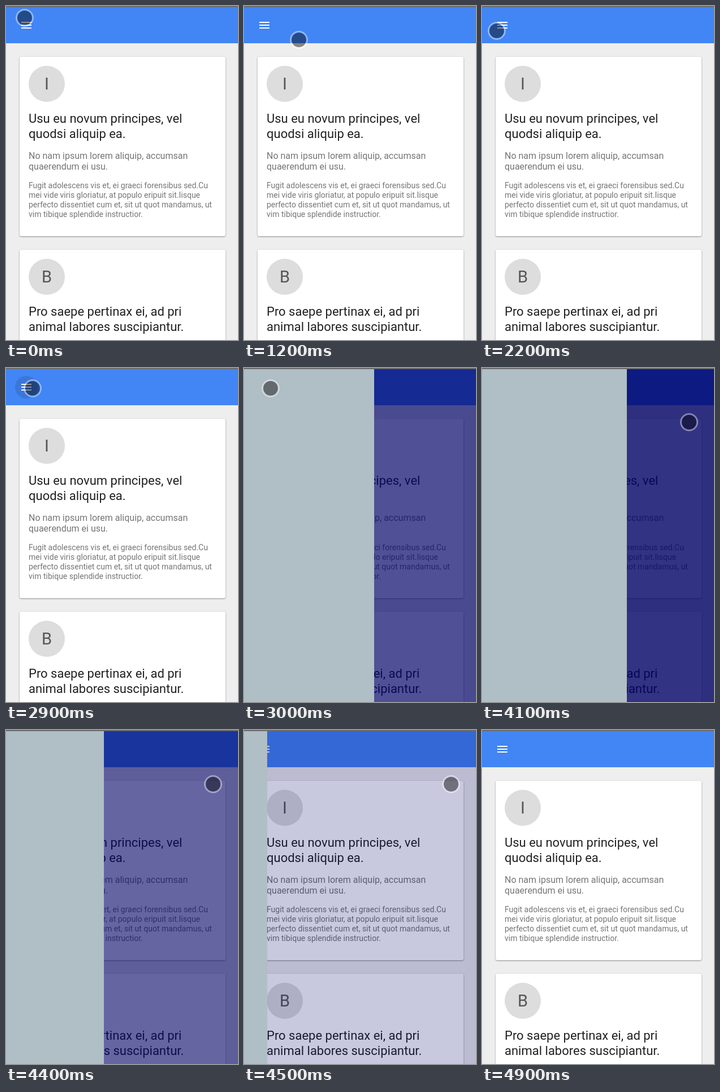
These frames come from a looping animation (410 px wide and 592 px high, 7000 ms). An HTML page:

```html
<!DOCTYPE html>
<html lang="la">
<head>
<meta charset="utf-8">
<title>Side drawer</title>
<style>
  html, body { margin: 0; width: 100%; height: 100%; overflow: hidden; background: #eee; }
  svg { display: block; width: 410px; height: 592px; font-family: Roboto, sans-serif; }
  .card { fill: #fff; filter: drop-shadow(0 1px 1px rgba(0,0,0,.36)) drop-shadow(0 0 1px rgba(0,0,0,.1)); }
  .avatar { fill: #ddd; }
  .letter { font-size: 29px; fill: #555; text-anchor: middle; }
  .title { font-size: 22px; fill: #212121; }
  .sub { font-size: 16px; fill: #757575; }
  .body { font-size: 14px; fill: #757575; }
</style>
</head>
<body>
<svg viewBox="0 0 410 592">
  <rect width="410" height="592" fill="#eee"/>
  <rect width="410" height="66" fill="#4285f4"/>
  <circle id="ripple" cx="36" cy="34" fill="#000" fill-opacity=".11"/>
  <path d="M27 28h18v2h-18zM27 33h18v2h-18zM27 38h18v2h-18z" fill="#fff"/>
  <g id="cards"></g>
  <rect id="backdrop" width="410" height="592" fill="#006"/>
  <rect id="drawer" width="256" height="592" fill="#b0bec5"/>
  <rect width="410" height="2" fill="#6b6b6b"/>
  <g id="pointer">
    <circle r="14.5" fill="none" stroke="#fff" stroke-opacity=".4" stroke-width="3"/>
    <circle r="13" fill="#000" fill-opacity=".44"/>
  </g>
</svg>
<script>
const LOOP = 7000, STEP = 100, WIDTH = 256;
const $ = id => document.getElementById(id);

const lines = (cls, y, gap, rows) => rows.map((row, i) =>
  `<text class="${cls}" x="40" y="${y + i * gap}">${row}</text>`).join('');

const card = (y, letter, title, sub = [], body = []) => `<g transform="translate(0 ${y})">
  <rect class="card" x="24" width="364" height="318" rx="3"/>
  <circle class="avatar" cx="72" cy="48" r="32"/>
  <text class="letter" x="72" y="58">${letter}</text>
  ${lines('title', 117, 27, title)}${lines('sub', 181, 19, sub)}${lines('body', 233, 17, body)}</g>`;

$('cards').innerHTML =
  card(90, 'I',
    ['Usu eu novum principes, vel', 'quodsi aliquip ea.'],
    ['No nam ipsum lorem aliquip, accumsan', 'quaerendum ei usu.'],
    ['Fugit adolescens vis et, ei graeci forensibus sed.Cu',
     'mei vide viris gloriatur, at populo eripuit sit.Iisque',
     'perfecto dissentiet cum et, sit ut quot mandamus, ut',
     'vim tibique splendide instructior.']) +
  card(432, 'B', ['Pro saepe pertinax ei, ad pri', 'animal labores suscipiantur.']);

// cubic-bezier(.25, .8, .25, 1)
function swift(p) {
  if (p <= 0) return 0;
  if (p >= 1) return 1;
  const curve = (s, a, b) => 3 * (1 - s) * s * ((1 - s) * a + s * b) + s * s * s;
  let lo = 0, hi = 1;
  for (let i = 0; i < 24; i++) {
    const mid = (lo + hi) / 2;
    if (curve(mid, .25, .25) < p) lo = mid; else hi = mid;
  }
  return curve(lo, .8, 1);
}

// Pointer strokes: [visible from, visible until, [time, x, y]...]
const strokes = [
  [0, 1600, [0, 33, 21], [100, 44, 31], [200, 60, 44], [300, 75, 55], [400, 84, 61],
    [1100, 84, 61], [1200, 97, 60], [1300, 146, 54], [1400, 208, 46], [1500, 258, 41]],
  [2200, 4900, [2200, 26, 44], [2300, 34, 40], [2400, 39, 37], [2500, 39, 37],
    [2600, 44, 36], [2700, 47, 36], [3500, 47, 36], [3600, 60, 35], [3700, 120, 43],
    [3800, 210, 61], [3900, 295, 79], [4000, 346, 91], [4100, 366, 96]]
];

function pointerAt(t) {
  const stroke = strokes.find(([from, until]) => t >= from && t < until);
  if (!stroke) return null;
  const keys = stroke.slice(2);
  const i = keys.findIndex(k => k[0] > t);
  if (i < 0) return keys[keys.length - 1].slice(1);
  const a = keys[i - 1], b = keys[i], p = (t - a[0]) / (b[0] - a[0]);
  return [a[1] + (b[1] - a[1]) * p, a[2] + (b[2] - a[2]) * p];
}

function openness(t, openTime, closeTime) {
  if (t < 3000) return 0;
  if (t < 3200) return swift((t - 2830) / openTime);
  return t < 4400 ? 1 : 1 - swift((t - 4360) / closeTime);
}

function draw(t) {
  $('drawer').setAttribute('x', Math.round(WIDTH * (openness(t, 400, 400) - 1)));
  $('backdrop').setAttribute('opacity', (.8 * openness(t, 460, 530)).toFixed(3));
  $('ripple').setAttribute('r', t >= 2800 && t < 3100 ? Math.min(20, 14 + (t - 2800) * .06) : 0);
  const at = pointerAt(t), pointer = $('pointer');
  pointer.setAttribute('visibility', at ? 'visible' : 'hidden');
  if (at) pointer.setAttribute('transform', `translate(${at})`);
}

const start = performance.now();
function tick() {
  const t = (performance.now() - start) % LOOP;
  draw(Math.floor(t / STEP) * STEP);
  requestAnimationFrame(tick);
}
tick();
</script>
</body>
</html>
```
